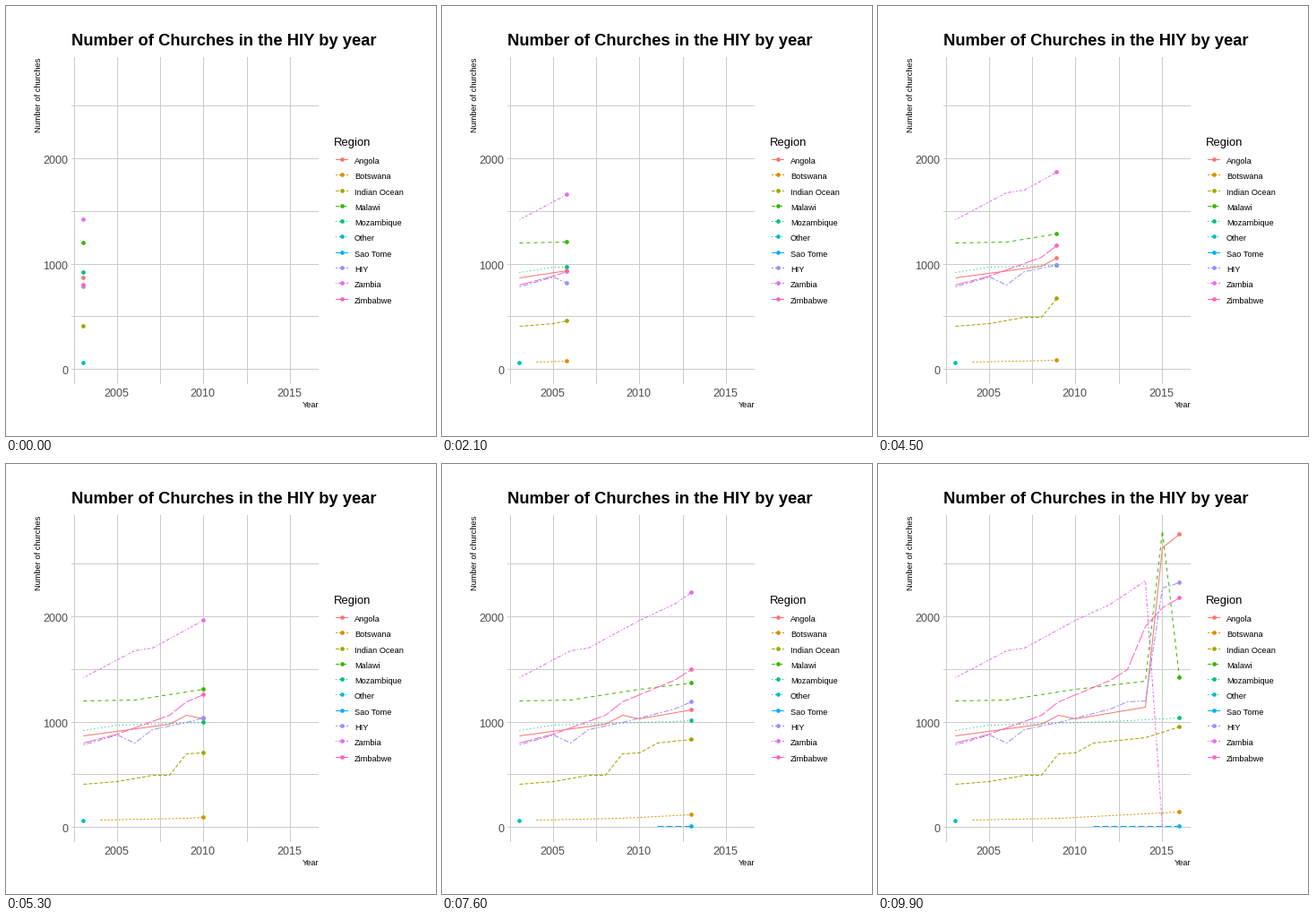
Animation, 480 px wide and 480 px high, one loop 10 s. Source, as a matplotlib script:

```python
import numpy as np
import matplotlib as mpl
import matplotlib.pyplot as plt
from matplotlib.animation import FuncAnimation
from matplotlib.patches import Circle

mpl.rcParams["font.family"] = "Liberation Sans"
mpl.rcParams["path.simplify"] = False

FRAMES, FIRST, LAST = 100, 2003, 2016
LEFT, RIGHT, TOP, BOTTOM = 73, 349, 57, 422
GRID, TICK = "#CCCCCC", "#4D4D4D"

# name, dash pattern (hex digits, px), turning points as {year - 2000: value}
SERIES = [
    ("Angola", "", {3: 873, 8: 983, 9: 1065, 10: 1028, 14: 1140, 15: 2658, 16: 2784}),
    ("Botswana", "22", {4: 72, 9: 88, 16: 148}),
    ("Indian Ocean", "42", {3: 411, 5: 436, 7: 496, 8: 497, 9: 697, 10: 710,
                            11: 800, 14: 856, 16: 956}),
    ("Malawi", "44", {3: 1203, 6: 1212, 10: 1314, 14: 1385, 15: 2820, 16: 1424}),
    ("Mozambique", "13", {3: 921, 5: 970, 12: 1003, 16: 1041}),
    ("Other", "1343", {3: 64}),
    ("Sao Tome", "73", {11: 10, 16: 12}),
    ("HIY", "2262", {3: 786, 5: 880, 6: 800, 7: 930, 9: 995, 12: 1125,
                     13: 1195, 14: 1205, 15: 2274, 16: 2325}),
    ("Zambia", "12223242", {3: 1424, 6: 1678, 7: 1705, 10: 1968, 12: 2122,
                            14: 2340, 15: 0}),
    ("Zimbabwe", "F282", {3: 803, 5: 885, 8: 1062, 9: 1190, 12: 1395, 13: 1500,
                          14: 1905, 15: 2086, 16: 2180}),
]


def hue(i):
    """Evenly spaced hue i of the palette: CIE LCh(uv), lightness 65, chroma 100."""
    light, chroma = 65, 100
    angle = np.radians(15 + 360 * i / len(SERIES))
    y = ((light + 16) / 116) ** 3
    u = chroma * np.cos(angle) / (13 * light) + 0.19784
    v = chroma * np.sin(angle) / (13 * light) + 0.46834
    x, z = 2.25 * y * u / v, y * (3 - 0.75 * u - 5 * v) / v
    rgb = np.clip([3.2405 * x - 1.5371 * y - 0.4985 * z,
                   -0.9693 * x + 1.8760 * y + 0.0416 * z,
                   0.0556 * x - 0.2040 * y + 1.0572 * z], 0, 1)
    return np.clip(np.where(rgb > 0.0031308, 1.055 * rgb ** (1 / 2.4) - 0.055,
                            12.92 * rgb), 0, 1)


def pixel(v):
    """Centre of the pixel that holds v."""
    return np.floor(np.asarray(v, float) + 0.5) + 0.5


def px(year):
    return pixel(85.6 + 19.27 * (np.asarray(year) - FIRST))


def py(value):
    return pixel(405.2 - 0.11755 * np.asarray(value))


def dashes(code):
    return (0, [int(c, 16) for c in code]) if code else "-"


fig = plt.figure(figsize=(480 / 72, 480 / 72), dpi=72, facecolor="white")
ax = fig.add_axes([0, 0, 1, 1])
ax.set_xlim(0, 480)
ax.set_ylim(480, 0)
ax.axis("off")


def stroke(x, y, color, ls="-", z=2):
    return ax.plot(x, y, color=color, lw=1, ls=ls, zorder=z, snap=False,
                   dash_capstyle="butt", solid_capstyle="butt")[0]


def dot(x, y, color):
    return ax.add_patch(Circle((x, y), 2.35, fc=color, lw=0, zorder=3, snap=False))


def label(x, y, s, size, color="black", **kw):
    ax.text(x, y, s, fontsize=size, color=color, va="baseline", **kw)


for year in np.arange(2002.5, LAST, 2.5):
    stroke([px(year)] * 2, [TOP, BOTTOM], GRID, z=1)
for value in range(0, 2501, 500):
    stroke([LEFT, RIGHT], [py(value)] * 2, GRID, z=1)

for year in (2005, 2010, 2015):
    label(px(year) - 0.8, 436.5, str(year), 12.5, TICK, ha="center")
for value in (0, 1000, 2000):
    label(69.4, py(value) + 5.2, str(value), 12.5, TICK, ha="right")

label(73, 44, "Number of Churches in the HIY by year", 18.4, weight="bold")
label(349, 448.5, "Year", 9.2, ha="right")
label(38.7, 57.5, "Number of churches", 9.2, ha="right", rotation=90,
      rotation_mode="anchor")
label(365.8, 156, "Region", 13)

tracks = []
for i, (name, code, points) in enumerate(SERIES):
    color = hue(i)
    y = pixel(171 + 17.28 * i)
    stroke([368, 382], [y, y], color, dashes(code))
    dot(375.5, y, color)
    label(389, y + 4.3, name, 9.2)
    years = 2000 + np.array(list(points))
    values = np.array(list(points.values()))
    tracks.append((years, values, stroke([], [], color, dashes(code)),
                   dot(px(years[0]), py(values[0]), color)))

# Each year is reached on a whole frame
YEARS = np.arange(FIRST, LAST + 1)
KEYS = np.round(np.linspace(0, FRAMES - 1, len(YEARS)))


def draw(frame):
    now = np.interp(frame, KEYS, YEARS)
    for years, values, line, head in tracks:
        tip = np.clip(now, years[0], years[-1])
        passed = years < tip
        xs = px(np.append(years[passed], tip))
        ys = py(np.append(values[passed], np.interp(tip, years, values)))
        line.set_data(xs, ys)
        head.set_center((xs[-1], ys[-1]))
        # A lone point stays; a series shows its head only while it runs
        head.set_visible(len(years) == 1 or years[0] <= now <= years[-1])
    return [artist for t in tracks for artist in t[2:]]


anim = FuncAnimation(fig, draw, frames=FRAMES, interval=100, repeat=True,
                     repeat_delay=0, blit=False)
plt.show()
```
